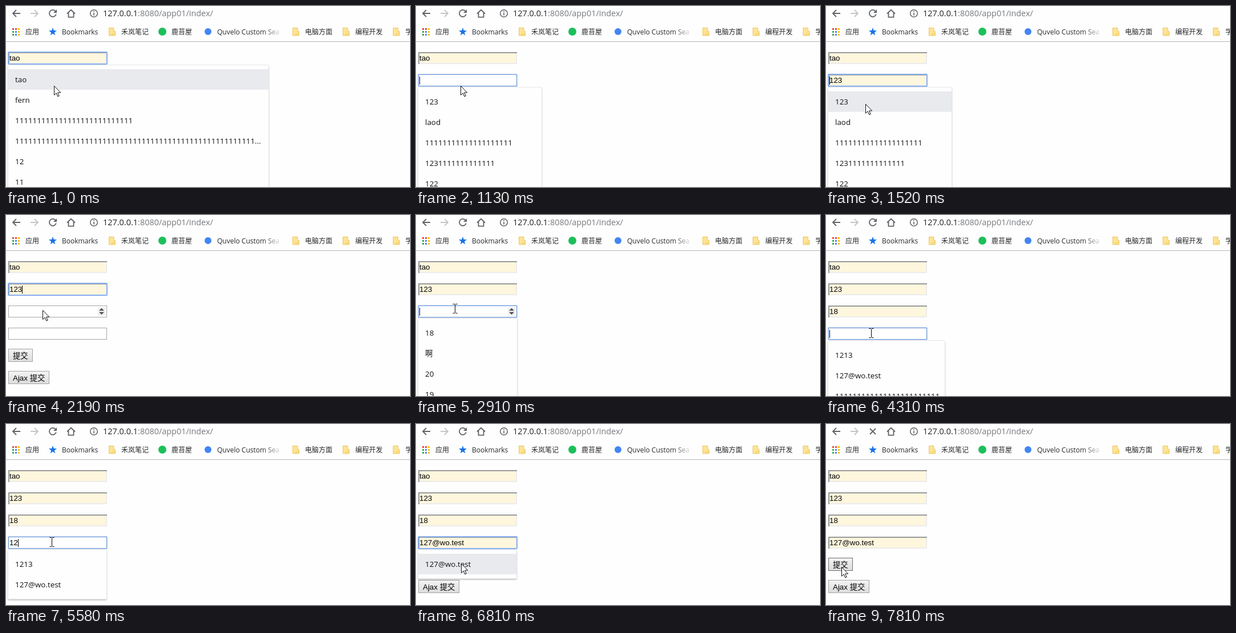
Recreate the animation shown at these times as an HTML page. Size 708x318 px, loop 8000 ms.

```html
<!DOCTYPE html>
<html lang="zh">
<head>
<meta charset="utf-8">
<title>Form autofill</title>
<style>
html, body { margin: 0; width: 100%; height: 100%; overflow: hidden; background: #fefefe; }
svg { display: block; width: 100%; height: 100%; }
text { font-family: "Open Sans", "Noto Sans CJK SC", "Noto Sans CJK", sans-serif; white-space: pre; }
.mark { font-size: 12px; fill: #26282b; }
.url { font-size: 14.45px; fill: #202124; }
.row { font-size: 13.36px; fill: #111; }
.input { font: 13.333px "Liberation Sans", "Noto Sans CJK SC", "Noto Sans CJK", sans-serif; fill: #000; }
.icon { fill: none; stroke: #5f6368; stroke-width: 1.8; }
</style>
</head>
<body>
<svg viewBox="0 0 708 318" preserveAspectRatio="none">
  <defs>
    <linearGradient id="fade" gradientUnits="userSpaceOnUse" x1="452" x2="484" y1="0" y2="0">
      <stop offset="0" stop-color="#26282b"/>
      <stop offset="1" stop-color="#26282b" stop-opacity="0"/>
    </linearGradient>
    <linearGradient id="face" x2="0" y2="1">
      <stop offset="0" stop-color="#f4f4f4"/>
      <stop offset="1" stop-color="#dcdcdc"/>
    </linearGradient>
    <filter id="shadow" x="-5%" y="-5%" width="110%" height="110%">
      <feDropShadow dx="0" dy="2" stdDeviation="1" flood-opacity=".2"/>
    </filter>
  </defs>
  <rect width="708" height="318" fill="#fefefe"/>
  <g class="icon">
    <path d="M25 13H12M18 7L12 13L18 19"/>
    <path d="M43 13H56M50 7L56 13L50 19" stroke="#c3c5c8"/>
    <path d="M107 13.500L114 6.800L121 13.500M109.500 12V19.600H118.500V12"/>
    <circle cx="154" cy="13" r="6.300" stroke-width="1.500"/>
    <path d="M154 12V16.500M154 9V10.700" stroke-width="1.600"/>
  </g>
  <text class="url" x="170" y="18">127.0.0.1<tspan fill="#75797e">:8080/app01/index/</tspan></text>
  <g id="marks"></g>
  <path d="M0 62.500H708" stroke="#b6b6b6"/>
  <g id="scene"></g>
</svg>
<script>
const LOOP = 8000;
const $ = id => document.getElementById(id);
const rect = (x, y, w, h, attrs) => `<rect x="${x}" y="${y}" width="${w}" height="${h}" ${attrs}/>`;
const path = (d, attrs) => `<path d="${d}" ${attrs}/>`;
const label = (cls, x, y, s, attrs = '') => `<text class="${cls}" x="${x}" y="${y}" ${attrs}>${s}</text>`;

const ones = n => '1'.repeat(n);
const fields = [
  { y: 81, focus: 0, open: 0, pick: 430, value: 'tao', width: 458,
    rows: ['tao', 'fern', ones(27), ones(55) + '...', '12', '11'] },
  { y: 120, focus: 710, open: 850, pick: 2190, value: '123', width: 218,
    rows: ['123', 'laod', ones(20), '123' + ones(13), '122'] },
  { y: 159, focus: 2620, open: 2910, pick: 3740, value: '18', width: 175,
    rows: ['18', '啊', '20', '19'] },
  { y: 198, focus: 4170, open: 4310, pick: 7090, value: '127@wo.test', width: 206,
    rows: ['1213', '127@wo.test', ones(24)] }
];
const BLUR = 7660, RELOAD = 7810;
const typing = [[5340, '1'], [5580, '12'], [5890, '127']];
const caretOff = [[0, 430], [4580, 4850], [6420, 7090]];

// start, end, target x, target y, text cursor
const moves = [
  [0, 0, 84, 140, 0], [430, 850, 79, 132, 1], [1130, 1130, 78, 140, 0],
  [1130, 1530, 64, 188, 0], [1530, 1790, 64, 167, 0], [2340, 2620, 68, 164, 1],
  [3620, 3620, 68, 207, 0], [3740, 4030, 79, 207, 1], [4580, 4850, 80, 207, 1],
  [6290, 6810, 79, 245, 0], [7090, 7520, 27, 251, 0]
];

function pointerAt(t) {
  let x = 0, y = 0, beam = 0;
  for (const [t0, t1, tx, ty, shape] of moves) {
    if (t < t0) break;
    const n = Math.round((t1 - t0) / 135);
    const p = t >= t1 ? 1 : Math.floor((t - t0) / (t1 - t0) * n) / n;
    x += (tx - x) * p;
    y += (ty - y) * p;
    if (p > 0) beam = shape;
  }
  return { x: Math.round(x), y: Math.round(y), beam };
}

const pen = document.createElement('canvas').getContext('2d');
pen.font = '13.333px "Liberation Sans", sans-serif';

function drawField(y, value, auto, focused) {
  const box = (fill, stroke) => rect(4.5, y + .5, 172, 20, `fill="${fill}" stroke="${stroke}"`);
  let out;
  if (auto) {
    out = rect(4, y, 173, 21, 'fill="#fef6dd"')
      + path(`M5 ${y + 20}H176V${y + 1}`, 'fill="none" stroke="#ececec" stroke-width="2"')
      + path(`M5 ${y + 21}V${y + 1}H177`, 'fill="none" stroke="#999" stroke-width="2"');
    if (focused) out += rect(4, y, 173, 21, 'fill="none" stroke="#8bb1ee" stroke-width="2" rx="1"');
  } else {
    out = box('#fff', focused ? '#6f98d6' : '#a6a6a6');
    if (focused) out += rect(3.5, y - .5, 174, 22, 'fill="none" stroke="#a9c6f0" stroke-opacity=".65" rx="1"');
  }
  return out + label('input', 6, y + 15, value);
}

function drawSpinner(y) {
  return rect(161, y + 3, 13, 15, 'fill="#f0f0f0"')
    + path(`M163 ${y + 9}l4.500 -4.500 4.500 4.500zM163 ${y + 11.5}l4.500 4.500 4.500 -4.500z`, 'fill="#505050"');
}

function drawButton(y, w, s, focused, pressed) {
  return rect(4.5, y + .5, w - 1, 22,
    `fill="${pressed ? '#d4d4d4' : 'url(#face)'}" stroke="${focused ? '#707070' : '#a3a3a3'}"`)
    + label('input', 12, y + 17, s);
}

function drawList(top, w, rows, hover) {
  let out = rect(3.5, top + .5, w - 1, 15 + 36 * rows.length,
    'fill="#fefefe" stroke="#e6e6e6" rx="2" filter="url(#shadow)"');
  rows.forEach((s, i) => {
    const y = top + 8 + 36 * i;
    if (i === hover) out += rect(4, y, w - 2, 36, 'fill="#e8eaed"');
    out += label('row', 16, y + 23, s);
  });
  return out;
}

function drawPointer({ x, y, beam }) {
  const at = `transform="translate(${x + .5} ${y + .5})"`;
  return beam
    ? path('M-4 -8H-1L0 -7L1 -8H4M0 -7V7M-4 8H-1L0 7L1 8H4', `${at} fill="none" stroke="#000"`)
    : path('M0 0V16L3.700 12.500L6.300 18.500L8.700 17.500L6.100 11.600H11.200Z', `${at} fill="#fff" stroke="#111"`);
}

function drawScene(t) {
  const mouse = pointerAt(t);
  const active = t < BLUR ? fields.findLastIndex(f => t >= f.focus) : -1;
  const blink = caretOff.some(([a, b]) => t >= a && t < b);
  let body = '', list = '', caret = '';

  fields.forEach((f, i) => {
    const top = f.y + 22, picked = t >= f.pick;
    const typed = i === 3 ? typing.reduce((s, [at, v]) => t >= at ? v : s, '') : '';
    let value = picked ? f.value : typed, preview = false;

    if (t >= f.open && !picked) {
      const rows = f.rows.filter(r => r.startsWith(typed));
      const hover = Math.floor((mouse.y - top - 8) / 36);
      preview = hover >= 0 && hover < rows.length;
      if (preview) value = rows[hover];
      list = drawList(top, rows.length < f.rows.length ? 174 : f.width, rows, hover);
    }
    body += drawField(f.y, value, picked || preview, i === active);
    if (i === 2 && t >= 2190 && t < 4170) body += drawSpinner(f.y);
    if (i === active && !blink) {
      const x = 6 + Math.round(preview ? 0 : pen.measureText(value).width);
      caret = rect(x, f.y + 4, 1, 14, 'fill="#000"');
    }
  });

  const pressed = t >= BLUR && t < RELOAD;
  body += drawButton(235, 43, '提交', t >= BLUR, pressed) + drawButton(274, 72, 'Ajax 提交');
  const load = t >= RELOAD
    ? path('M77 8L87 18M87 8L77 18', 'class="icon"')
    : path('M86.300 8.700A6 6 0 1 0 87.800 14.500', 'class="icon"') + path('M89 6V12H83Z', 'fill="#5f6368"');
  return load + body + caret + list + drawPointer(mouse);
}

function drawMarks() {
  const colors = ['#ea4335', '#ea4335', '#fbbc05', '#34a853', '#4285f4', '#fbbc05', '#34a853', '#4285f4', '#fbbc05'];
  let out = colors.map((c, i) => rect(11 + i % 3 * 5, 39 + Math.floor(i / 3) * 5, 3, 3, `fill="${c}"`)).join('');
  const star = Array.from({ length: 10 }, (_, i) => {
    const a = i * Math.PI / 5, r = i % 2 ? 3 : 7.4;
    return `${(82 + r * Math.sin(a)).toFixed(2)} ${(45.5 - r * Math.cos(a)).toFixed(2)}`;
  });
  out += path(`M${star.join('L')}Z`, 'fill="#1a73e8"');
  for (const x of [180, 502, 590, 678]) {
    out += path(`M${x + .5} 38.500h8.500v6h2.500v7.500h-11z`, 'fill="#ffe391" stroke="#ebc765"')
      + path(`M${x + 6} 52v-3h5.500`, 'fill="none" stroke="#ebc765"');
  }
  out += '<circle cx="274" cy="45" r="7" fill="#1dbf5b"/><circle cx="354" cy="45" r="6" fill="#4285f4"/>';
  const names = [[34, '应用'], [98, 'Bookmarks'], [202, '禾岚笔记'], [290, '鹿苔屋'],
    [524, '电脑方面'], [612, '编程开发'], [700, '学习']];
  for (const [x, s] of names) out += label('mark', x, 50, s);
  return out + label('mark', 370, 50, 'Quvelo Custom Sea', 'style="fill:url(#fade)"');
}

$('marks').innerHTML = drawMarks();
let shown = '';
function update(now) {
  const next = drawScene(now % LOOP);
  if (next !== shown) $('scene').innerHTML = shown = next;
}
const start = performance.now();
function tick() {
  update(performance.now() - start);
  requestAnimationFrame(tick);
}
tick();
</script>
</body>
</html>
```
